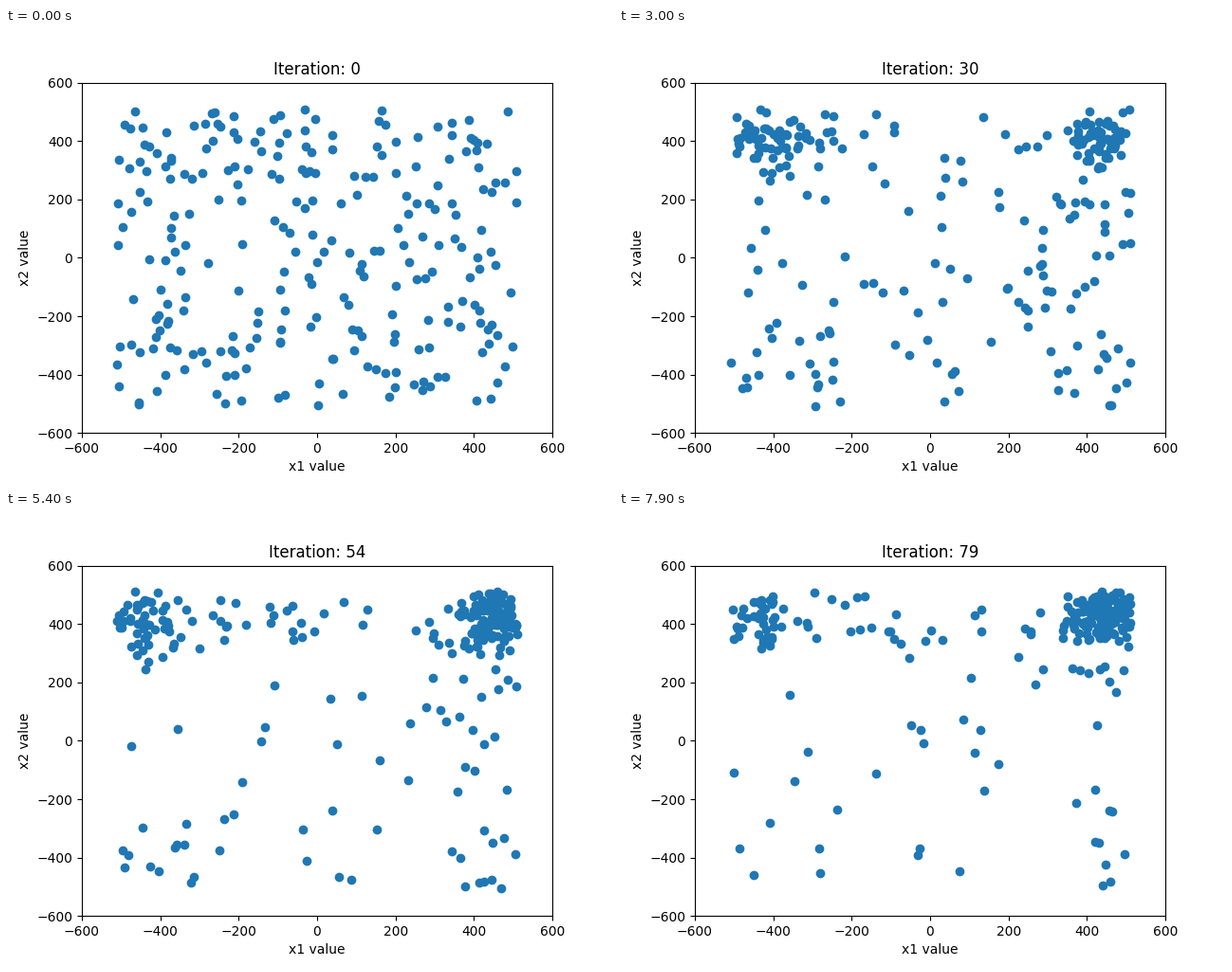
These frames come from a looping animation (640x480 px, 8000 ms). A matplotlib script:

```python
import numpy as np
import matplotlib.pyplot as plt
from matplotlib.animation import FuncAnimation

STEPS = 80
COUNT = 250
LIMIT = 512
BEST = np.array([455, 435])


def waits(rng, scale):
    """Heavy-tailed waiting times: many short, a few very long."""
    return scale * (1 / rng.uniform(0.02, 1, COUNT) - 1)


def reflect(p):
    return np.where(np.abs(p) > LIMIT, np.sign(p) * 2 * LIMIT - p, p)


def around(rng, centre, spread):
    return reflect(centre + rng.normal(0, 1, (COUNT, 2)) * spread)


def swarm():
    """Positions of all agents for every iteration."""
    rng = np.random.default_rng(12)
    pos = rng.uniform(-LIMIT, LIMIT, (COUNT, 2))

    # first away from the centre, then to a corner, at last to the best one
    outward = np.sign(pos) * LIMIT * (np.abs(pos) / LIMIT) ** 0.45
    best = around(rng, BEST, 38)
    left = around(rng, [-430, 405], 55)
    low = around(rng, [435, -280], [45, 95])

    west, south = pos[:, 0] < 0, pos[:, 1] < 0
    pick = rng.integers(0, 3, COUNT)
    to_left = west & (~south | (pick == 0))
    to_low = west & south & (pick == 1)
    corner = np.where(to_left[:, None], left,
                      np.where(to_low[:, None], low, best))

    first = waits(rng, 15)
    second = first + waits(rng, 50)
    speed = 20 * rng.lognormal(0, 0.3, (COUNT, 1))

    path = [pos]
    for step in range(1, STEPS):
        goal = np.where((step > first)[:, None], corner, outward)
        goal = np.where((step > second)[:, None], best, goal)
        gap = goal - pos
        dist = np.linalg.norm(gap, axis=1, keepdims=True) + 1e-9
        pos = pos + gap * np.minimum(0.12, speed / dist)
        pos = reflect(pos + rng.normal(0, 13, pos.shape))
        path.append(pos)
    return path


path = swarm()

fig, ax = plt.subplots(figsize=(6.4, 4.8), dpi=100)
dots = ax.scatter(*path[0].T)
ax.set(xlim=(-600, 600), ylim=(-600, 600),
       xlabel="x1 value", ylabel="x2 value")
title = ax.set_title("Iteration: 0")


def draw(i):
    dots.set_offsets(path[i])
    title.set_text(f"Iteration: {i}")
    return dots, title


anim = FuncAnimation(fig, draw, frames=STEPS, interval=100,
                     repeat=True, repeat_delay=0, blit=False)
plt.show()
```
